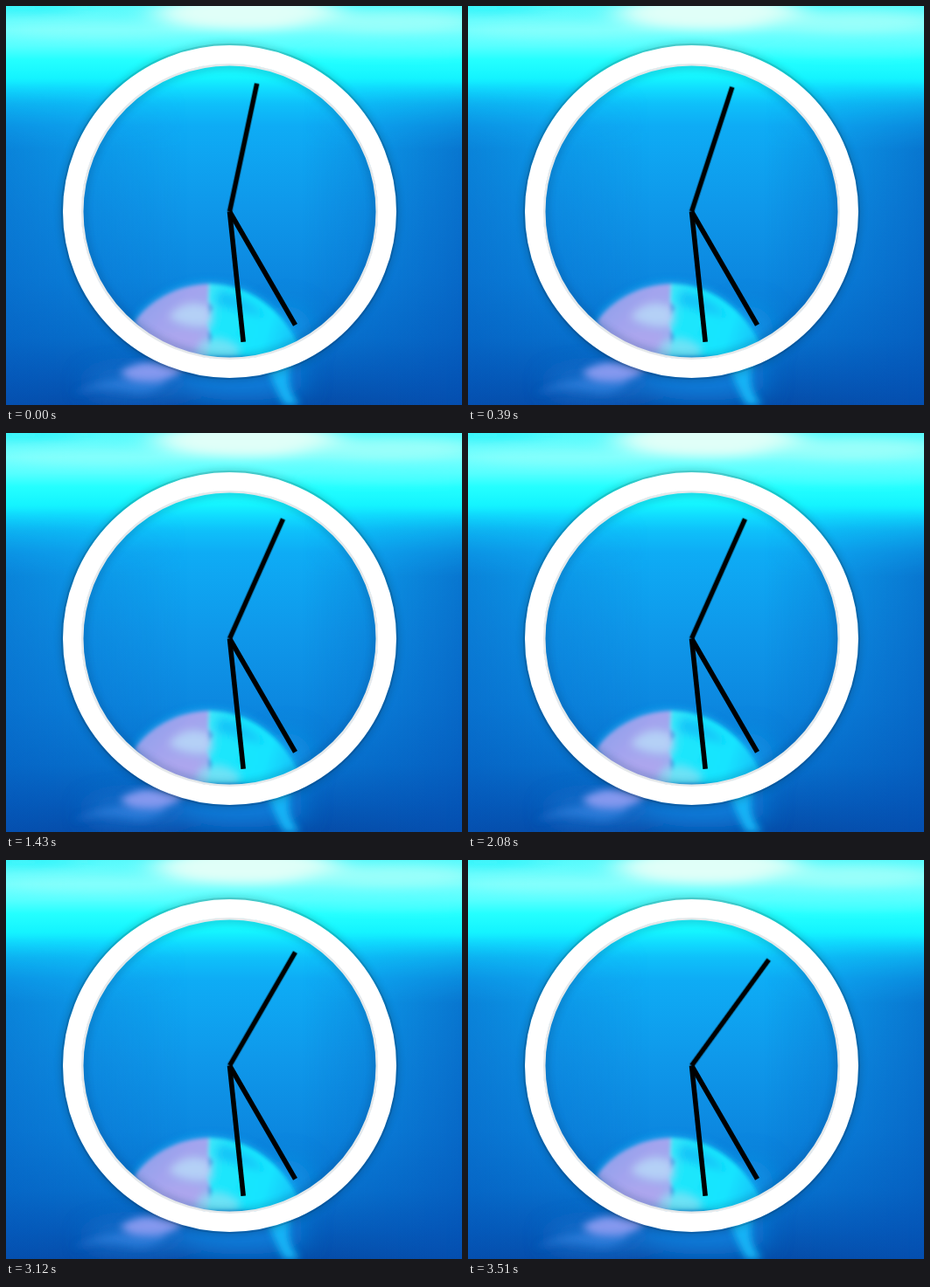
Recreate the animation shown at these times as an HTML page. Size 521x457 px, loop 3.77 s.

```html
<!DOCTYPE html>
<html lang="en">
<head>
<meta charset="utf-8">
<title>Clock</title>
<style>
  html, body { margin: 0; width: 100%; height: 100%; overflow: hidden; background: #0a84dc; }
  svg { display: block; width: 521px; height: 457px; }
  .hand { stroke: #000; stroke-width: 5.6; transform-origin: 255.5px 235.5px; }
</style>
</head>
<body>
<svg viewBox="0 0 521 457">
  <defs>
    <linearGradient id="sea" x2="0" y2="1">
      <stop offset="0" stop-color="#58fafc"/>
      <stop offset=".06" stop-color="#74fffe"/>
      <stop offset=".1" stop-color="#58ffff"/>
      <stop offset=".135" stop-color="#24ffff"/>
      <stop offset=".18" stop-color="#14f4ff"/>
      <stop offset=".21" stop-color="#10daff"/>
      <stop offset=".245" stop-color="#0ec0fa"/>
      <stop offset=".3" stop-color="#0eacf5"/>
      <stop offset=".5" stop-color="#0f98ea"/>
      <stop offset=".68" stop-color="#0c88e0"/>
      <stop offset=".83" stop-color="#0874d0"/>
      <stop offset=".93" stop-color="#065cba"/>
      <stop offset="1" stop-color="#064ca8"/>
    </linearGradient>
    <linearGradient id="sides">
      <stop offset="0" stop-color="#0454b8" stop-opacity=".42"/>
      <stop offset=".2" stop-color="#0454b8" stop-opacity=".18"/>
      <stop offset=".4" stop-color="#0454b8" stop-opacity="0"/>
      <stop offset=".65" stop-color="#0454b8" stop-opacity="0"/>
      <stop offset=".85" stop-color="#0454b8" stop-opacity=".32"/>
      <stop offset="1" stop-color="#0450b4" stop-opacity=".56"/>
    </linearGradient>
    <linearGradient id="fade" x2="0" y2="1">
      <stop offset=".19" stop-color="#000"/>
      <stop offset=".36" stop-color="#fff"/>
    </linearGradient>
    <mask id="deep"><rect width="521" height="457" fill="url(#fade)"/></mask>
    <linearGradient id="lilac" x2="1" y2="1">
      <stop offset="0" stop-color="#7c9ee8"/>
      <stop offset=".5" stop-color="#a4a4ee"/>
      <stop offset="1" stop-color="#98aef0"/>
    </linearGradient>
    <linearGradient id="aqua" x2="1" y2=".3">
      <stop offset="0" stop-color="#48e4f8"/>
      <stop offset=".3" stop-color="#1ee6fc"/>
      <stop offset=".75" stop-color="#12e4ff"/>
      <stop offset="1" stop-color="#12c8fa"/>
    </linearGradient>
    <filter id="b2" x="-30%" y="-30%" width="160%" height="160%"><feGaussianBlur stdDeviation="2"/></filter>
    <filter id="b4" x="-50%" y="-50%" width="200%" height="200%"><feGaussianBlur stdDeviation="4"/></filter>
    <filter id="b14" x="-50%" y="-100%" width="200%" height="300%"><feGaussianBlur stdDeviation="14"/></filter>
    <filter id="streak" x="-50%" y="-150%" width="200%" height="400%"><feGaussianBlur stdDeviation="18 6"/></filter>
    <clipPath id="dome">
      <path d="M147 362C162 338 196 318 234 318C278 320 314 346 333 386L322 402H178Z"/>
    </clipPath>
  </defs>

  <rect width="521" height="457" fill="url(#sea)"/>
  <rect width="521" height="457" fill="url(#sides)" mask="url(#deep)"/>

  <!-- surface light -->
  <g filter="url(#streak)">
    <ellipse cx="275" cy="8" rx="105" ry="20" fill="#e0fff8"/>
    <ellipse cx="440" cy="18" rx="100" ry="12" fill="#a8fff8" opacity=".75"/>
    <ellipse cx="110" cy="28" rx="110" ry="9" fill="#90fffc" opacity=".6"/>
    <ellipse cx="20" cy="2" rx="70" ry="7" fill="#20f0fa" opacity=".6"/>
    <ellipse cx="440" cy="52" rx="90" ry="6" fill="#58ffff" opacity=".5"/>
  </g>

  <!-- jellyfish -->
  <g filter="url(#b14)">
    <ellipse cx="270" cy="430" rx="75" ry="22" fill="#0e8ae6" opacity=".75"/>
    <ellipse cx="150" cy="432" rx="60" ry="14" fill="#2a80dc" opacity=".7"/>
    <ellipse cx="320" cy="375" rx="30" ry="32" fill="#10a4f0" opacity=".6"/>
  </g>
  <path d="M147 362C162 338 196 318 234 318C278 320 314 346 333 386" fill="none" stroke="#18b0f6" stroke-width="7" opacity=".6" filter="url(#b4)"/>
  <g filter="url(#b2)">
    <g clip-path="url(#dome)">
      <rect x="140" y="310" width="92" height="95" fill="url(#lilac)"/>
      <path d="M232 310L231 338L236 346L229 362L235 380L228 405H340V310Z" fill="url(#aqua)"/>
      <g filter="url(#b4)">
        <path d="M186 356Q206 332 234 346V366Q204 370 186 356Z" fill="#b4d0f6"/>
        <path d="M160 384Q196 362 226 376V392Q200 396 172 400Z" fill="#aca6ee"/>
        <path d="M244 326Q274 332 296 356Q270 350 240 342Z" fill="#12c4f8"/>
        <path d="M222 386Q244 372 268 392L262 404H216Z" fill="#88e0f4" opacity=".75"/>
      </g>
    </g>
  </g>
  <g filter="url(#b4)">
    <path d="M130 420Q152 404 178 410L204 416Q186 431 160 430Q140 429 130 420Z" fill="#8498ee"/>
    <path d="M76 444Q106 428 142 428L186 430Q166 448 142 442Q110 434 76 444Z" fill="#3a88e6" opacity=".55"/>
    <path d="M298 412L326 408Q316 436 336 457H318Q308 440 298 412Z" fill="#12b4f6"/>
  </g>

  <!-- clock face -->
  <g fill="none" transform="translate(255.5 235.5)">
    <circle r="190" stroke="#000" stroke-width="6" opacity=".2" filter="url(#b4)"/>
    <circle r="191.5" stroke="#000" stroke-width="2.5" opacity=".12"/>
    <circle r="167" stroke="#003868" stroke-width="4" opacity=".4" filter="url(#b4)"/>
    <circle r="168.5" stroke="#e4e8ea" stroke-width="3"/>
    <circle r="180" stroke="#fff" stroke-width="21"/>
  </g>

  <path class="hand" d="M255.5 235.5v-150" style="transform:rotate(150deg)"/>
  <path class="hand" d="M255.5 235.5v-150" style="transform:rotate(174deg)"/>
  <path class="hand" id="second" d="M255.5 235.5v-150"/>
</svg>
<script>
  const LOOP = 3770;
  // [time in ms, angle in degrees]
  const ticks = [[0, 12], [260, 18], [1300, 24], [2340, 30], [3380, 36], [LOOP, 36]];
  document.getElementById('second').animate(
    ticks.map(([t, deg]) => ({
      offset: t / LOOP,
      transform: `rotate(${deg}deg)`,
      easing: 'steps(1, end)'
    })),
    { duration: LOOP, iterations: Infinity }
  );
</script>
</body>
</html>
```
